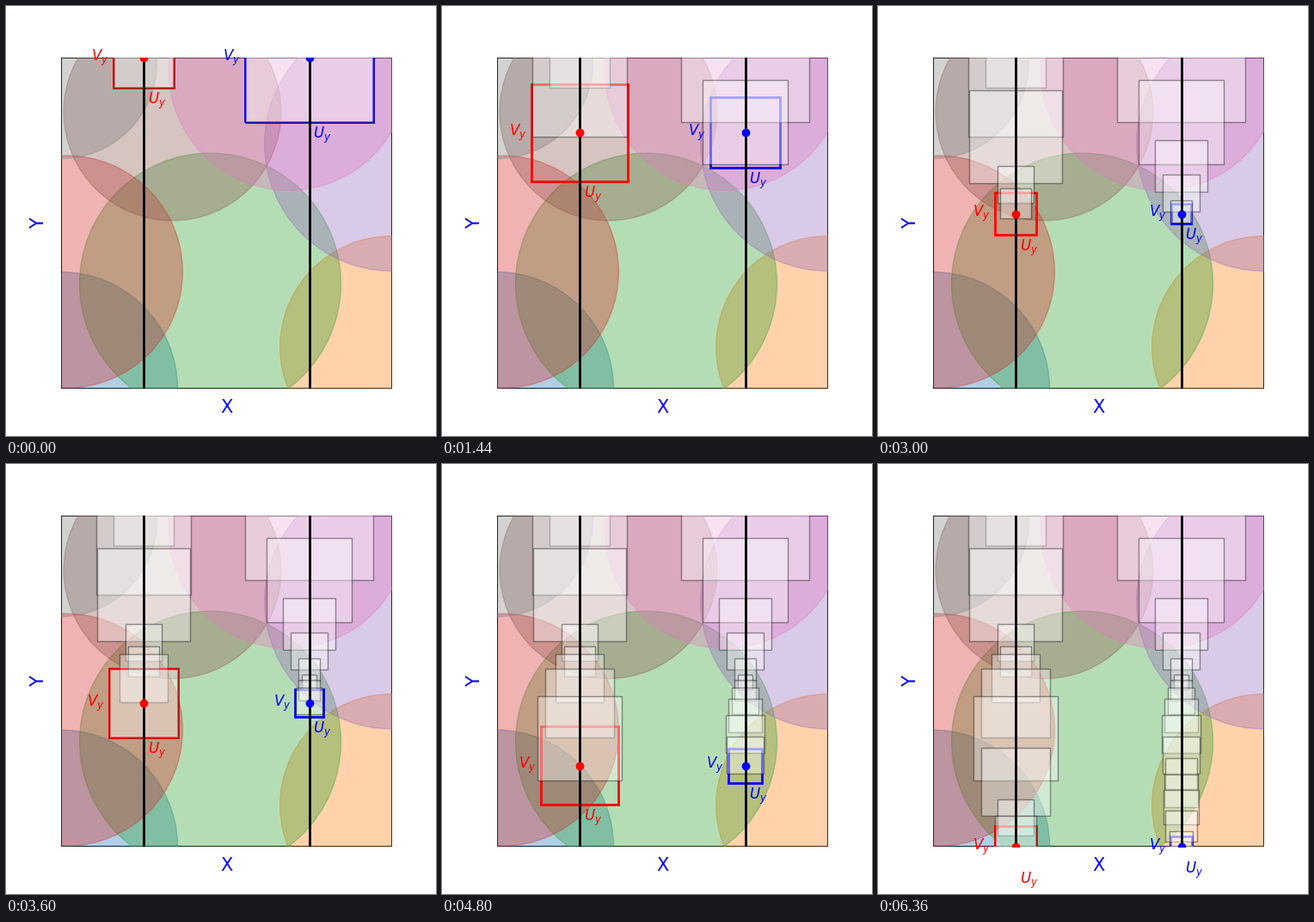
Write a matplotlib script that moves like this. It is 500 px wide and 500 px high and loops after 6.4 s.

```python
import numpy as np
import matplotlib.pyplot as plt
from matplotlib.animation import FuncAnimation
from matplotlib.patches import Circle, Rectangle

FRAMES = 160
LOOP_MS = 6400
GAP = 0.04      # label offset
MARGIN = 0.01   # keeps each square strictly inside its disc

# Open cover of the unit square: centre x, centre y, radius, colour
DISCS = [
    (0.0, 0.0, 0.3527, "tab:blue"),
    (0.998, 0.125, 0.336, "tab:orange"),
    (0.4513, 0.3169, 0.3947, "tab:green"),
    (0.017, 0.353, 0.351, "tab:red"),
    (1.0, 0.74, 0.3846, "tab:purple"),
    (0.337, 0.836, 0.3283, "tab:brown"),
    (0.688, 0.961, 0.362, "tab:pink"),
    (0.0, 0.985, 0.29, "tab:gray"),
]
HEIGHTS = np.linspace(1, 0, FRAMES)


def half_size(x, y):
    """Half side of the largest safe square around (x, y) in one disc."""
    room = max(r - np.hypot(x - cx, y - cy) for cx, cy, r, _ in DISCS)
    return room / np.sqrt(2) - MARGIN


def square(x, y, h, **style):
    return ax.add_patch(Rectangle((x - h, y - h), 2 * h, 2 * h, **style))


class Tube:
    """A point sliding down a vertical line, leaving a finite subcover."""

    def __init__(self, x, color):
        self.x = x
        self.box = square(x, 1, 0, fill=False, ec=color, lw=2)
        self.cover = []
        floor = 2
        for i, y in enumerate(HEIGHTS):
            if y < floor:
                h = half_size(x, y)
                patch = square(x, y, h, fc="white", ec="black", alpha=0.4)
                self.cover.append((i, patch))
                floor = y - h
        ax.plot([x, x], [0, 1], color="black", lw=2)
        self.dot, = ax.plot([x], [1], "o", color=color, ms=6)
        label = dict(color=color, fontsize=12, ha="center", va="center")
        self.v = ax.text(x, 1, "$V_y$", **label)
        self.u = ax.text(x, 1, "$U_y$", **label)

    def update(self, i):
        x, y = self.x, HEIGHTS[i]
        h = half_size(x, y)
        self.box.set_bounds(x - h, y - h, 2 * h, 2 * h)
        self.dot.set_data([x], [y])
        self.v.set_position((x - h - GAP, y))
        self.u.set_position((x + GAP, y - h - GAP))
        for start, patch in self.cover:
            patch.set_visible(i >= start)


fig, ax = plt.subplots(figsize=(5, 5), dpi=100)
fig.subplots_adjust(left=0.125, right=0.9, bottom=0.11, top=0.88)
ax.set(xlim=(0, 1), ylim=(0, 1), aspect="equal")
ax.axis("off")

ax.add_patch(Rectangle((0, 0), 1, 1, fill=False, ec="black", lw=1.5))
for cx, cy, r, color in DISCS:
    ax.add_patch(Circle((cx, cy), r, color=color, alpha=0.35))

axis_label = dict(color="blue", fontsize=15, ha="center", va="center")
ax.text(0.5, -0.058, "X", **axis_label)
ax.text(-0.068, 0.5, "Y", rotation=90, **axis_label)

tubes = [Tube(0.25, "red"), Tube(0.75, "blue")]


def update(i):
    for tube in tubes:
        tube.update(i)
    return []


anim = FuncAnimation(fig, update, frames=FRAMES, init_func=lambda: update(0),
                     interval=LOOP_MS / FRAMES, repeat=True, repeat_delay=0)
plt.show()
```
